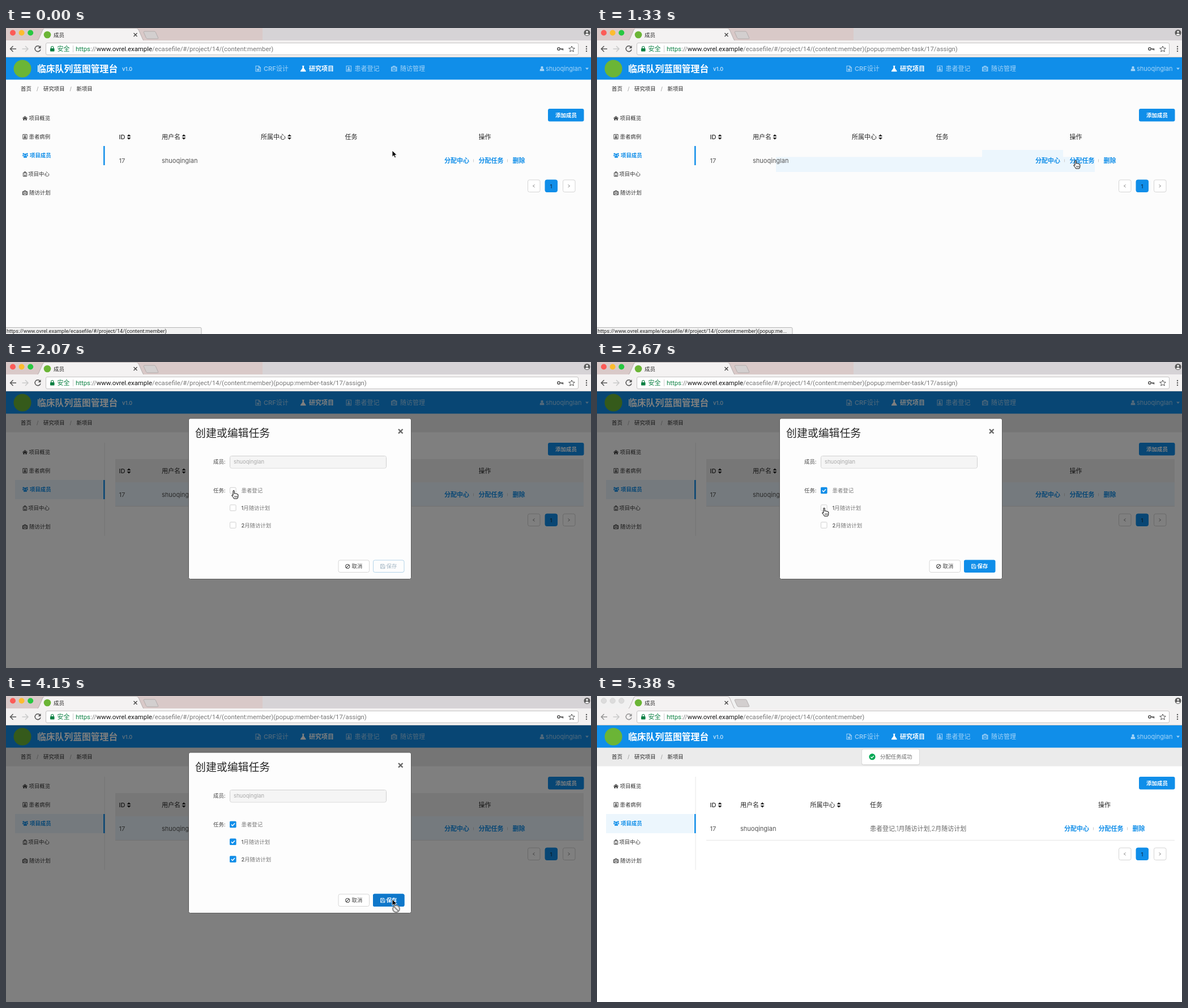
An HTML page that plays this animation: 1033x542 px, repeating every 5.48 s.

```html
<!DOCTYPE html>
<html lang="zh-CN">
<head>
<meta charset="utf-8">
<title>成员</title>
<style>
html, body { margin: 0; width: 100%; height: 100%; overflow: hidden; background: #fff; }
svg { display: block; width: 1033px; height: 542px; }
text { font-family: Inter, "Noto Sans CJK SC", "Noto Sans CJK", sans-serif; white-space: pre; }
.ui { font-family: Roboto, "Noto Sans CJK SC", "Noto Sans CJK", sans-serif; }
</style>
</head>
<body>
<script>
const LOOP = 5480, BLUE = '#108ee9', INK = '#262626';
const USER = 'shuoqinglan';
const HOST = 'www.ovrel.example', PATH = '/ecasefile/#/project/14/(content:member)';

// Drawing helpers; text is placed by the middle of its line.
const text = (x, cy, s, size, fill = INK, weight = 400, extra = '') =>
  `<text x="${x}" y="${cy + size * .37}" font-size="${size}" fill="${fill}" font-weight="${weight}" ${extra}>${s}</text>`;
const rect = (x, y, w, h, fill, extra = '') =>
  `<rect x="${x}" y="${y}" width="${w}" height="${h}" fill="${fill}" ${extra}/>`;
const circle = (x, y, r, fill, extra = '') =>
  `<circle cx="${x}" cy="${y}" r="${r}" fill="${fill}" ${extra}/>`;
const path = (d, fill = 'none', extra = '') => `<path d="${d}" fill="${fill}" ${extra}/>`;
const line = (d, color, w = 1) => path(d, 'none', `stroke="${color}" stroke-width="${w}"`);
const group = (id, ...parts) => `<g id="${id}">${parts.join('')}</g>`;

// Icons on a 10 by 10 grid: [outline, solid]
const ICONS = {
  home: ['', 'M0 5.2L5 .8 10 5.2 9.3 6 5 2.3.7 6zM1.5 6L5 3 8.5 6V9.5H5.9V6.8H4.1V9.5H1.5z'],
  card: ['M1 .5h8v9h-8z', 'M5 2.2a1.5 1.5 0 0 1 0 3a1.5 1.5 0 0 1 0-3M2.4 8q0-2.5 2.6-2.5T7.6 8z'],
  users: ['', 'M5 1.6a1.9 1.9 0 0 1 0 3.8a1.9 1.9 0 0 1 0-3.8M2 9q-.3-3.4 3-3.4T8 9zM1.8.8a1.4 1.4 0 0 1 0 2.8a1.4 1.4 0 0 1 0-2.8M8.2.8a1.4 1.4 0 0 1 0 2.8a1.4 1.4 0 0 1 0-2.8M0 6q-.2-2 1.6-2.2L3 5.4 1.8 6.6zM10 6q.2-2-1.6-2.2L7 5.4l1.2 1.2z'],
  clinic: ['M1.5 9.5V2.5h2v-2h3v2h2v7zM4 9.5V7h2v2.5M5 1.4v2.2M3.9 2.5h2.2M3 5h1M6 5h1', ''],
  kit: ['M.5 2.5h9v6.5h-9zM3.3 2.5V.8h3.4v1.7M2 2.5V9M8 2.5V9M5 4v3.4M3.3 5.7h3.4', ''],
  flask: ['', 'M3.2 0h3.6v1H6.2v3l3.5 5q.2 1-.7 1H1q-.9 0-.7-1L3.8 4V1h-.6z'],
  file: ['M1 .5h5.2L9 3.2v6.3H1zM6 .5v3h3M3 5l1 3 1-2.6L6 8l1-3', ''],
  user: ['', 'M5 .3a2.4 2.4 0 0 1 0 4.9a2.4 2.4 0 0 1 0-4.9M.8 9.6Q.5 5 3 5q2 1.3 4 0 2.5 0 2.2 4.6z'],
  ban: ['M5 .8a4.2 4.2 0 0 1 0 8.4a4.2 4.2 0 0 1 0-8.4M2 8L8 2', ''],
  save: ['M.6.6h6.8l2 2v6.8h-8.8zM2.5.6v2.8h4V.6M2.3 9.4V6h5.4v3.4', '']
};
const icon = (name, x, cy, color, size = 9, w = 1) => {
  const [outline, solid] = ICONS[name];
  return `<g transform="translate(${x} ${cy - size / 2}) scale(${size / 10})">` +
    line(outline, color, w) + path(solid, color) + '</g>';
};
const sorter = (x, cy) => path(`M${x} ${cy - 1}l3.5-3.8 3.5 3.8zM${x} ${cy + 1}l3.5 3.8 3.5-3.8z`, '#222');

function browser() {
  const lights = ['#fc5b57', '#fdbc2e', '#28c840'];
  const edge = 'stroke="#aaa4a4" stroke-width=".8"';
  const url = (id, tail) => `<text id="${id}" class="ui" x="123" y="41" font-size="11.35" fill="#777">` +
    `<tspan fill="#0b8043">https</tspan>://<tspan fill="#111">${HOST}</tspan>${PATH}${tail}</text>`;
  return rect(0, 0, 1033, 23, '#d6d3d6') +
    group('warm', rect(0, 0, 453, 23, '#d9c9c8')) +
    group('idle', rect(0, 0, 1033, 23, '#f1f1f1')) +
    line('M0 22.5H1033', '#b9b3b3') +
    path('M54 23q2.5-.5 3.6-3l7-16q1.5-3.5 4-3.5H230q3 0 4.5 3.5l7 16q1.1 2.5 3.5 3z', '#f4f2f2', edge) +
    rect(0, 22, 1033, 30, '#f3f1f1') + line('M0 51.5H1033', '#c9c9c9') +
    group('active', ...lights.map((c, i) => circle(12 + i * 15.6, 8.5, 5, c))) +
    group('inactive', ...lights.map((c, i) => circle(12 + i * 15.6, 8.5, 4.7, '#dcdcdc', 'stroke="#c8c8c8" stroke-width=".6"'))) +
    circle(73, 12, 6.3, '#6bb536') + text(84, 12, '成员', 9.5) +
    line('M225.5 9l6 6m0-6l-6 6', '#444', 1.3) +
    path('M243 7.5q0-1.5 2-1.5h17q1.5 0 2.2 1.5l4.5 10q.6 1.5-1.5 1.5h-17q-2 0-2.7-1.5z', '#d3cfcf', edge) +
    circle(1026, 8.5, 5.5, '#5a5a5a') + circle(1026, 6.8, 1.9, '#eee') + path('M1022.5 11.5q3.5-3.5 7 0l-1.5 1.5h-4z', '#eee') +
    group('arrows', line('M18 37H7.5m5-5l-5 5 5 5', '#555', 1.5),
      line('M60 33.5a5 5 0 1 0 1 4.5', '#555', 1.5), path('M61.5 31v5h-5z', '#555')) +
    line('M28.5 37H39m-5-5l5 5-5 5', '#c9c9c9', 1.5) +
    rect(70.5, 26.5, 940, 21, '#fff', 'rx="2.5" stroke="#c4c2c2"') +
    rect(78, 36, 7.5, 5.5, '#0b8043', 'rx=".8"') + line('M79.7 36v-1.5a2 2 0 0 1 4 0V36', '#0b8043', 1.2) +
    text(90.5, 37, '安全', 11, '#0b8043') + line('M118.5 31V43', '#ccc') +
    url('urlList', '') + url('urlPopup', '(popup:member-task/17/assign)') +
    circle(976, 37, 2.2, 'none', 'stroke="#555" stroke-width="1.6"') + line('M978 37h5.5v2.5m-2-2.5v2', '#555', 1.5) +
    line('M999 32l1.5 3.5 3.8.3-2.9 2.5.9 3.7-3.3-2-3.3 2 .9-3.7-2.9-2.5 3.8-.3z', '#555') +
    [33, 37, 41].map(y => circle(1025, y, 1.2, '#555')).join('');
}

function header() {
  const soft = '#a5d4f7';
  const item = (name, x, label, dx, color, weight) =>
    icon(name, x, 72, color, 10.5) + text(x + dx, 72, label, 11, color, weight);
  return rect(0, 52, 1033, 39.5, BLUE) + circle(29, 72, 15.5, '#6bb536') +
    text(55, 72, '临床队列蓝图管理台', 15.8, '#fff', 700) + text(205, 72, 'v1.0', 9.5, '#d5ebfb', 500) +
    item('file', 440, 'CRF设计', 15, soft, 500) + item('flask', 519.5, '研究项目', 15.5, '#fff', 700) +
    item('card', 600, '患者登记', 15.5, soft, 500) + item('kit', 680, '随访管理', 16, soft, 500) +
    icon('user', 942, 72, soft) + text(953, 72, USER, 11, soft) + path('M1023 70.5h6l-3 3.5z', soft);
}

function sidebar() {
  const items = [['home', 40.5, '项目概览'], ['card', 40.5, '患者病例'], ['users', 42, '项目成员'],
    ['clinic', 39.3, '项目中心'], ['kit', 41, '随访计划']];
  return items.map(([name, x, label], i) => {
    const y = 159.5 + i * 33.1, on = name === 'users', color = on ? BLUE : '#333';
    return icon(name, 29, y, color, on ? 10 : 9) + text(x, y, label, 9.4, color, on ? 600 : 400);
  }).join('') + rect(172, 209, 2.5, 34, BLUE);
}

function table(id, [name, center, task, act, link], tasks) {
  const head = (x, s) => text(x, 193, s, 11, INK, 500);
  return group(id,
    head(199.5, 'ID'), sorter(213.5, 193), head(name, '用户名'), sorter(name + 35.5, 193),
    head(center, '所属中心'), sorter(center + 47, 193), head(task, '任务'), head(act, '操作'),
    text(199.5, 235, '17', 11, '#555'), text(name, 235, USER, 11, '#555'), text(task, 235, tasks, 11, '#666', 300),
    ...[[0, '分配中心'], [60.5, '分配任务'], [120.5, '删除']].map(([dx, s]) => text(link + dx, 235, s, 11, BLUE, 600)),
    line(`M${link + 51.5} 232.5v5m60-5v5`, '#ccc'));
}

function page() {
  const pageBox = (x, stroke, fill) => rect(x, 269, 21.5, 21.5, fill, `rx="3" stroke="${stroke}"`);
  const crumbs = [[26, '首页'], [66, '研究项目'], [124.5, '新项目']];
  return rect(0, 52, 1033, 490, '#fcfcfc') +
    group('panels', rect(0, 52, 1033, 490, '#fff'), rect(0, 91, 1033, 33.5, '#ebebeb'),
      rect(16, 209, 157, 34, '#ecf6fd'), line('M174 143V308M193 255.5H1020', '#e6e6e6')) +
    group('rowBack', rect(193, 172, 827, 41, '#efefef'), rect(193, 213, 827, 42, '#ecf6fd')) +
    group('hover1', rect(680, 216, 143, 13, '#ecf6fd')) + group('hover2', rect(316, 228.5, 563, 26.5, '#ecf6fd')) +
    header() +
    crumbs.map(([x, s]) => text(x, 107.5, s, 9.4)).join('') +
    [54, 112.5].map(x => text(x, 107.5, '/', 9.4, '#999')).join('') +
    sidebar() + rect(957, 143, 63.5, 22.5, BLUE, 'rx="3"') + text(970, 154.5, '添加成员', 9.5, '#fff', 700) +
    table('before', [275, 450, 598.5, 834.5, 774], '') +
    table('after', [253, 376.5, 482, 885, 825], '患者登记,1月随访计划,2月随访计划') +
    pageBox(921.5, '#d4d4d4', '#fff') + pageBox(952, BLUE, BLUE) + pageBox(983.5, '#d4d4d4', '#fff') +
    line('M933.5 277.5l-3 2.3 3 2.3M992.5 277.5l3 2.3-3 2.3', '#777', .9) + text(960.5, 280, '1', 9.5, '#123');
}

function modal() {
  const month = n => `<tspan fill="#333" font-weight="400">${n}</tspan>月随访计划`;
  const option = (y, label, i) => rect(395.5, y - 5.5, 10.5, 10.5, '#fff', 'rx="1.5" stroke="#d0d0d0"') +
    group('tick' + i, rect(395, y - 6, 11.5, 11.5, BLUE, 'rx="1.5"'), line(`M397.8 ${y - .2}l2.2 2.3 4-4.3`, '#fff', 1.5)) +
    text(415.5, y, label, 9.4, '#777', 300);
  const save = (color, weight) => icon('save', 661, 362, color, 8.5) + text(671.5, 362, '保存', 9.4, color, weight);
  const saveBox = fill => rect(648, 350.5, 55.5, 22.5, fill, 'rx="3"');
  return group('modal',
    rect(322.5, 100, 393, 284.5, '#fdfdfd', 'rx="3" stroke="#5c5c5c"'),
    text(334, 126, '创建或编辑任务', 18.9), line('M693 119l7.5 7.5m0-7.5l-7.5 7.5', '#666', 2.4),
    text(366, 177, '成员:', 9.4, '#444'), rect(395.5, 166.5, 276, 21.5, '#fff', 'rx="3" stroke="#d0d0d0"'),
    group('locked', rect(396, 167, 275, 20.5, '#f5f5f5', 'rx="3"')), text(402, 177, USER, 9.4, '#aaa'),
    text(366, 227.5, '任务:', 9.4, '#444'),
    option(227.8, '患者登记', 1), option(258.5, month(1), 2), option(289.2, month(2), 3),
    rect(587, 351, 54.5, 21.5, '#fff', 'rx="3" stroke="#d6d6d6"'),
    icon('ban', 599, 362, '#444', 8.5, 1.3), text(610.5, 362, '取消', 9.4, '#444'),
    group('saveOff', rect(648.5, 351, 54.5, 21.5, '#fdfdfd', 'rx="3" stroke="#b4d4ea"'), save('#a3b6c4', 400)),
    group('saveOn', saveBox(BLUE), group('saveHover', saveBox('#0e77ca')), save('#fff', 700)));
}

function extras() {
  const url = 'https://' + HOST + PATH;
  const tip = (id, tail) => group(id, text(1, 537, url + tail, 9.2, '#222', 400, 'class="ui"'));
  const arrow = path('M0 0V11.3L2.7 8.8 4.5 13 6.5 12.1 4.7 8.1H8.3z', '#000', 'stroke="#fff" stroke-width=".9"');
  return group('toast', rect(467, 94, 103, 28.5, '#000', 'rx="4" opacity=".12"'),
      rect(467.5, 94, 102, 27.5, '#fff', 'rx="3" stroke="#d8d8d8" stroke-width=".8"'),
      circle(486, 107.7, 5.6, '#00a854'), line('M483.3 107.7l2 2 3.5-3.7', '#fff', 1.3),
      text(500, 107.7, '分配任务成功', 9.4, '#666', 300)) +
    group('status', rect(-1, 530.5, 346, 14, '#f2f2f2', 'rx="2" stroke="#b5b5b5"'),
      tip('tipList', ''), tip('tipPopup', '(popup:me...')) +
    group('pointer', group('arrow', arrow),
      group('hand', path('M-1 0Q.2-1 1.2 0V5.2Q2.5 4 3.7 5.4 5 4.6 6 6 7.5 5.6 7.8 7V10Q7.8 12 6.5 14H.5Q-.6 11.5-3 9-3.6 7.4-2.4 7.2L-1 8.4z', '#fff', 'stroke="#000"'),
        line('M1.8 9v3m1.9-3v3m1.9-3v3', '#000', .7)),
      group('denied', arrow, circle(7, 17, 6, '#eee', 'stroke="#8a8a8a" stroke-width="2"'), line('M3 13l8 8', '#8a8a8a', 1.8)));
}

const shade = group('shade', rect(0, 52, 1033, 490, '#000', 'opacity=".5"'));
document.body.innerHTML =
  `<svg viewBox="0 0 1033 542">${page()}${shade}${modal()}${browser()}${extras()}</svg>`;

// Pointer stops: [time, x, y, shape]
const POINTER = [
  [0, 682, 217, 'arrow'], [150, 812, 219, 'arrow'], [300, 868, 240, 'hand'], [440, 901, 237, 'hand'],
  [590, 893, 238, 'hand'], [740, 872, 237, 'hand'], [890, 856, 236, 'hand'], [1030, 848, 235, 'hand'],
  [1180, 845, 235, 'hand'], [1470, 838, 235, 'arrow'], [1620, 752, 240, 'arrow'], [1770, 590, 240, 'arrow'],
  [1920, 455, 234, 'arrow'], [2070, 402, 228, 'hand'], [2520, 402, 242, 'hand'], [2670, 401, 259, 'hand'],
  [2960, 401, 274, 'hand'], [3110, 401, 289, 'hand'], [3400, 470, 318, 'arrow'], [3550, 602, 348, 'arrow'],
  [3700, 672, 359, 'hand'], [3850, 682, 360, 'hand'], [4000, 682, 360, 'denied'], [4290, 692, 351, 'arrow'],
  [4740, 822, 432, 'arrow'], [4890, 961, 527, 'arrow'], [5040, 0, 0, '']
];
// Span of time in which each part is visible
const SPANS = {
  warm: [0, 5380], active: [0, 5380], idle: [5380, LOOP], inactive: [5380, LOOP],
  urlPopup: [1330, 4290], panels: [1470, LOOP], rowBack: [1470, 4290],
  hover1: [150, 1470], hover2: [300, 1470], before: [0, 4290], after: [4290, LOOP],
  shade: [1470, 4290], modal: [1470, 4290], locked: [1620, 4290],
  tick1: [2220, 4290], tick2: [2820, 4290], tick3: [3260, 4290],
  saveOff: [1470, 2220], saveOn: [2220, 4290], saveHover: [3700, 4290],
  toast: [4290, LOOP], status: [0, 1770], tipList: [0, 300], tipPopup: [300, 1770]
};
const $ = id => document.getElementById(id);
const show = (id, on) => { $(id).style.display = on ? '' : 'none'; };
const start = performance.now();

function draw() {
  const t = (performance.now() - start) % LOOP;
  for (const [id, [from, to]] of Object.entries(SPANS)) show(id, t >= from && t < to);
  show('urlList', t < 1330 || t >= 4290);
  $('arrows').style.opacity = t < 5380 ? 1 : .6;
  const [, x, y, shape] = POINTER.filter(p => p[0] <= t).pop();
  for (const id of ['arrow', 'hand', 'denied']) show(id, id === shape);
  $('pointer').setAttribute('transform', `translate(${x} ${y})`);
  requestAnimationFrame(draw);
}
draw();
</script>
</body>
</html>
```
